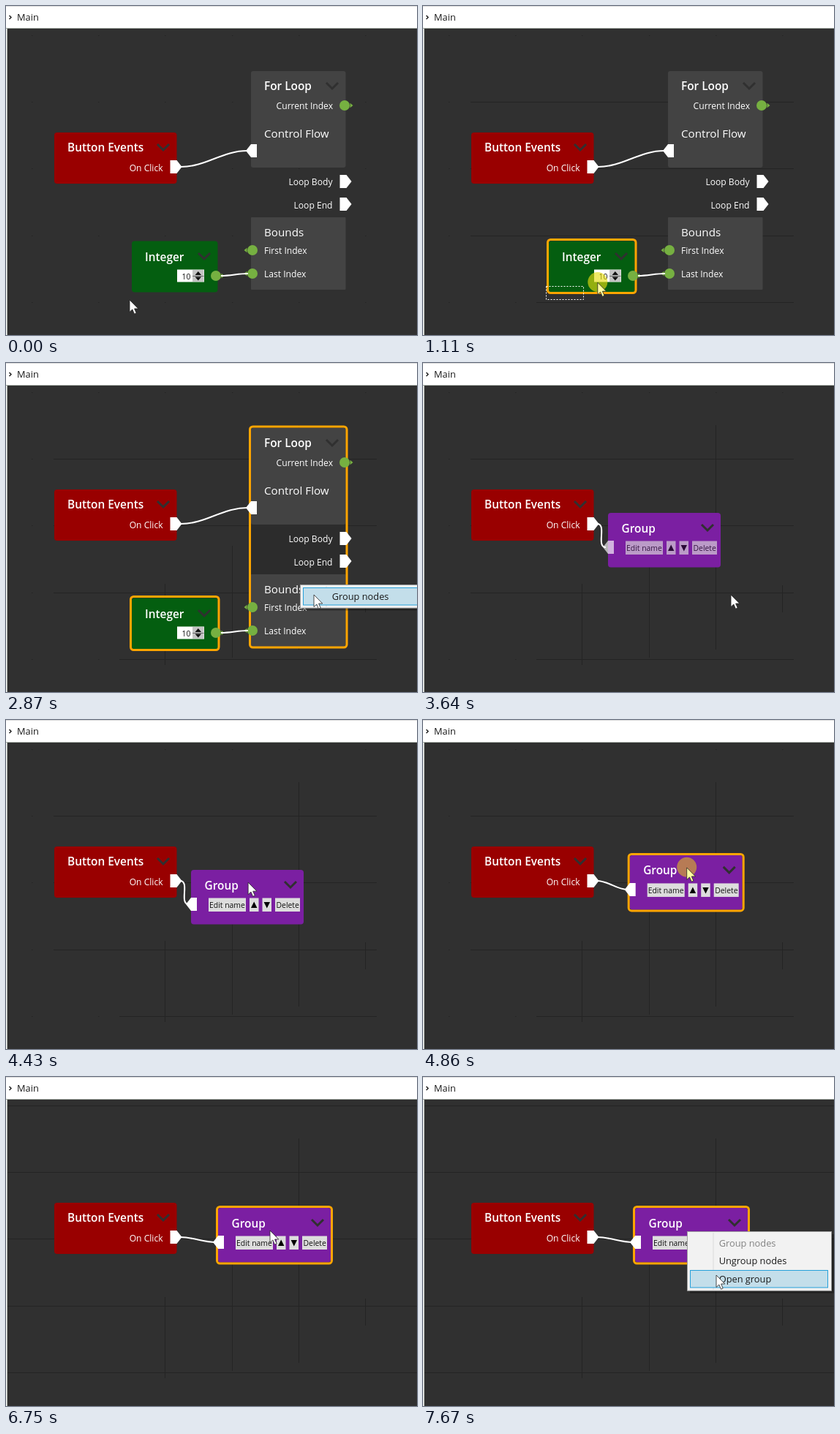
These frames come from a looping animation (562 px wide and 450 px high, 8 s). An HTML page:

```html
<!DOCTYPE html>
<html lang="en">
<head>
<meta charset="utf-8">
<title>Node editor: grouping nodes</title>
<style>
html, body { margin: 0; width: 100%; height: 100%; overflow: hidden; background: #303030; }
svg { display: block; width: 562px; height: 450px; font-family: "Open Sans", "Noto Sans", sans-serif; }
.title { font-size: 15.4px; font-weight: 600; fill: #fff; }
.section { font-size: 15.2px; fill: #fff; }
.port { font-size: 12.1px; fill: #fff; }
.small { font-size: 10.4px; fill: #111; }
.item { font-size: 12.8px; fill: #1a1a1a; }
.wire { fill: none; stroke: #fff; stroke-width: 2; }
.chevron { fill: none; stroke: #303030; stroke-width: 3; }
.ring { fill: none; stroke: #ffa500; stroke-width: 3; }
</style>
</head>
<body>
<svg id="stage" viewBox="0 0 562 450"></svg>
<script>
const LOOP = 8000;
const PAN_AT = 5400;
const GRID = 91.2;

const rect = (x, y, w, h, fill, extra = '') =>
  `<rect x="${x}" y="${y}" width="${w}" height="${h}" fill="${fill}" ${extra}/>`;
const text = (x, y, cls, s, extra = '') => `<text x="${x}" y="${y}" class="${cls}" ${extra}>${s}</text>`;
const endText = (x, y, s) => text(x, y, 'port', s, 'text-anchor="end"');
const chevron = (x, y) => `<path class="chevron" d="M${x - 8} ${y - 4}l8 8l8-8"/>`;
const flowOut = (x, y) => `<path fill="#fff" d="M${x} ${y - 9}h9l7 9l-7 9h-9z"/>`;
const flowIn = (x, y) => `<path fill="#fff" d="M${x} ${y}l7-9h8v18h-8z"/>`;
const dataPort = (x, y, side) =>
  `<g fill="#76b041"><circle cx="${x}" cy="${y}" r="7"/><path d="M${x + 7.5 * side} ${y - 3.2}l${4 * side} 3.2l${-4 * side} 3.2z"/></g>`;
const ring = (id, x, y, w, h) =>
  `<rect id="${id}" class="ring" x="${x - 1.5}" y="${y - 1.5}" width="${w + 3}" height="${h + 3}" rx="4"/>`;

function wirePath(x1, y1, x2, y2) {
  const d = Math.max((x2 - x1) * 0.38, 14);
  return `M${x1} ${y1}C${x1 + d} ${y1} ${x2 - d} ${y2} ${x2} ${y2}`;
}

// Faint background grid: crossings, short row lines, column pieces, then full rows after the pan
function gridMarkup() {
  const col = i => Math.round(35 + i * GRID);
  const row = j => Math.round(40 + j * GRID);
  const line = (x, y, w, h) => rect(x, y, w, h, '#242424');
  let dots = '', rows = '', fullRows = '';
  for (let j = 0; j < 5; j++) {
    for (let i = 0; i < 6; i++) dots += line(col(i), row(j), 1.5, 1);
    if (j) rows += line(j < 4 ? 65 : 155, row(j), j < 4 ? 442 : 352, 1);
    fullRows += line(1, row(j), 561, 1);
  }
  const columns = [[2, 302, 111], [3, 250, 153], [4, 85, 307], [5, 304, 37]]
    .map(([i, y, h]) => line(col(i), y, 1, h)).join('');
  return `${dots}<g id="rows">${rows}</g><g id="columns">${columns}</g><g id="fullRows">${fullRows}</g>`;
}

const buttonNode = rect(66, 173, 167.5, 70, '#990000', 'rx="4"') +
  text(84, 199, 'title', 'Button Events') + chevron(215, 193) +
  endText(214.5, 225.5, 'On Click') + flowOut(224.5, 220);

const loopNode = `<g id="loopGap">${rect(335, 221, 129.5, 68, '#2c2c2c')}</g>` +
  rect(335, 89, 129.5, 132, '#434343', 'rx="3"') +
  rect(335, 289, 129.5, 99, '#444', 'rx="1"') + ring('loopRing', 335, 88.5, 129.5, 299) +
  text(353, 115, 'title', 'For Loop') + chevron(446, 109) +
  endText(447, 140.5, 'Current Index') + dataPort(463, 136, 1) +
  text(353, 180, 'section', 'Control Flow') + flowIn(328, 198) +
  endText(446.5, 244.5, 'Loop Body') + flowOut(456.5, 240) +
  endText(446.5, 276.5, 'Loop End') + flowOut(456.5, 271) +
  text(353, 315, 'section', 'Bounds') +
  text(353, 339, 'port', 'First Index') + dataPort(337, 334, -1) +
  text(353, 370.5, 'port', 'Last Index') + dataPort(337, 366, -1);

const integerNode = rect(172, 321.5, 117.5, 70, '#045e10', 'rx="4"') + ring('intRing', 172, 321, 117.5, 70) +
  text(190, 348.5, 'title', 'Integer') + chevron(271, 342) +
  rect(234, 360.5, 37, 17, '#fff') + text(240.5, 373.5, 'small', '10') +
  rect(255, 361, 15.5, 16, '#c4c4c4') +
  '<path fill="#111" d="M258.5 368l4.3-5l4.3 5zM258.5 370.5h8.6l-4.3 5z"/>' +
  rect(255, 369, 15.5, 0.8, '#555') + dataPort(287, 369, 1);

const groupNode = rect(253, 205, 154, 74.5, '#7b1fa2', 'rx="4"') + ring('groupRing', 253, 205, 154, 74.5) +
  text(271.5, 231.5, 'title', 'Group') + chevron(389, 225) +
  '<g id="groupParts">' + flowIn(246, 252) +
  [[277, 51], [333, 12.5], [350.5, 12.5], [368, 34]].map(([x, w]) => rect(x, 243.5, w, 18.5, '#ddd')).join('') +
  text(278, 256.8, 'small', 'Edit name') + text(369.5, 256.8, 'small', 'Delete') +
  '<path fill="#000" d="M335 257l4.2-8.5l4.2 8.5zM352.6 249h8.4l-4.2 8.5z"/></g>';

function menuMarkup(id, x, y, items) {
  const h = 7 + 24.6 * items.length;
  let s = rect(4, 4, 198, h, '#000', 'opacity=".3"') +
    rect(0.5, 0.5, 197, h, '#f2f2f2', 'stroke="#a0a0a0"') + rect(35.5, 2, 1, h - 3, '#d9d9d9');
  items.forEach((label, i) => {
    const dim = items.length > 1 && i === 0;
    s += rect(4.5, 4.5 + i * 24.5, 188, 23.5, '#c3deea', `id="${id}Hover${i}" stroke="#26a0da"`) +
      text(43.7, 20.8 + i * 24.6, 'item', label, dim ? 'style="fill:#838383"' : '');
  });
  return `<g id="${id}" transform="translate(${x} ${y})">${s}</g>`;
}

document.getElementById('stage').innerHTML =
  rect(0, 0, 562, 450, '#303030') +
  '<g id="canvas">' + gridMarkup() + buttonNode +
  `<g id="parts">${loopNode}${integerNode}` +
  `<path class="wire" d="${wirePath(239, 220, 330, 198)}"/><path class="wire" d="${wirePath(294, 369, 331, 366)}"/></g>` +
  `<g id="group">${groupNode}</g><path id="groupWire" class="wire"/></g>` +
  '<rect id="band" fill="none" stroke="#fff" stroke-dasharray="2 2"/>' +
  menuMarkup('menuA', 402, 303, ['Group nodes']) +
  menuMarkup('menuB', 361, 211, ['Group nodes', 'Ungroup nodes', 'Open group']) +
  '<circle id="press" r="13.5"/>' +
  '<path id="cursor" stroke="#222" stroke-width=".8" d="M0 0V16.5L3.8 13L6.5 19.2L9.2 18L6.6 12H11.8Z"/>' +
  rect(0, 0, 1, 450, '#f4f6f4') + rect(1, 0, 1, 450, '#b0b4b0') +
  rect(0, 0, 562, 30, '#fff') + rect(0, 0, 562, 1, '#ddd') + rect(0, 30, 562, 1, '#a0a8a0') +
  '<path d="M4.5 13l2.5 2.5l-2.5 2.5" fill="none" stroke="#222" stroke-width="1.5"/>' +
  text(15, 20, 'item', 'Main');

const el = {};
document.querySelectorAll('[id]').forEach(e => { el[e.id] = e; });

const clamp = (v, a, b) => Math.min(b, Math.max(a, v));
const ramp = (t, a, b) => clamp((t - a) / (b - a), 0, 1);
const easeOut = p => Math.sin(p * Math.PI / 2);
const within = (t, a, b) => t >= a && t < b;
const show = (e, on) => e.setAttribute('visibility', on ? 'inherit' : 'hidden');
const move = (e, x, y) => e.setAttribute('transform', `translate(${x} ${y})`);

const dragFrom = { x: 331, y: 222, start: 4600, end: 5040 };

// Pointer moves: start, end, target x, target y
const pointerMoves = [
  [1000, 1540, 389, 327], [1540, 1750, 402, 303], [2800, 2870, 421, 317],
  [3890, 4450, dragFrom.x, dragFrom.y], [dragFrom.start, dragFrom.end, 368, 197],
  [5220, 5630, 126, 267], [5830, 6470, 361, 210], [7130, 7670, 401, 271]
];
const presses = [[960, 1915], [2260, 2400], [3330, 3450], [4500, 5220], [6650, 6750]];

function pointerAt(t) {
  let x = 169, y = 402;
  for (const [a, b, tx, ty] of pointerMoves) {
    const p = easeOut(ramp(t, a, b));
    x += (tx - x) * p;
    y += (ty - y) * p;
  }
  return [x, y];
}

function fadeMenu(menu, t, from, full, leave, gone) {
  const o = ramp(t, from, full) * (1 - ramp(t, leave, gone));
  menu.setAttribute('opacity', o);
  show(menu, o > 0);
}

function drawPointer(t, x, y) {
  const pressed = presses.some(([a, b]) => within(t, a, b));
  const dragging = within(t, 4500, 5220);
  move(el.cursor, x, y);
  el.cursor.setAttribute('fill', pressed ? '#ffffa0' : '#fff');
  move(el.press, x, y - 0.7);
  show(el.press, pressed);
  el.press.setAttribute('fill', dragging ? '#c8963f' : '#e6dc10');
  el.press.setAttribute('opacity', dragging ? 0.78 : 0.64);
}

function drawSelection(t) {
  const [x, y] = pointerAt(t - 30).map(Math.round);
  const banding = within(t, 1000, 1900) && x > 169;
  show(el.band, banding);
  if (banding) {
    el.band.setAttribute('x', 168.5);
    el.band.setAttribute('y', y - 0.5);
    el.band.setAttribute('width', x - 169);
    el.band.setAttribute('height', 402 - y);
  }
  const loopPicked = x > 335;
  show(el.loopRing, loopPicked);
  show(el.loopGap, loopPicked);
  show(el.intRing, x > 172 && y < 392);
}

function drawGroup(t) {
  const [x, y] = pointerAt(clamp(t, dragFrom.start, dragFrom.end));
  const dx = x - dragFrom.x, dy = y - dragFrom.y;
  const grouped = t >= 3540;
  show(el.parts, !grouped);
  show(el.group, grouped);
  show(el.groupWire, grouped);
  show(el.groupRing, t >= 4500);
  move(el.group, dx, dy);
  el.groupParts.setAttribute('opacity', ramp(t, 3530, 3700));
  el.groupWire.setAttribute('d', wirePath(238, 220, 250 + dx, 252 + dy));
}

function drawMenus(t, y) {
  fadeMenu(el.menuA, t, 2400, 2540, 3420, 3540);
  show(el.menuAHover0, t >= 2820);
  fadeMenu(el.menuB, t, 6790, 6930, LOOP, LOOP + 1);
  show(el.menuBHover0, false);
  show(el.menuBHover1, within(y, 240, 264));
  show(el.menuBHover2, y >= 264);
}

function render(t) {
  const [x, y] = pointerAt(t);
  const panned = t >= PAN_AT;
  move(el.canvas, 0, panned ? -1 : 0);
  show(el.rows, t >= 1000);
  show(el.columns, t >= 2260);
  show(el.fullRows, panned);
  drawPointer(t, x, y);
  drawSelection(t);
  drawGroup(t);
  drawMenus(t, y);
}

const start = performance.now();
function tick() {
  render((performance.now() - start) % LOOP);
  requestAnimationFrame(tick);
}
render(0);
requestAnimationFrame(tick);
</script>
</body>
</html>
```
